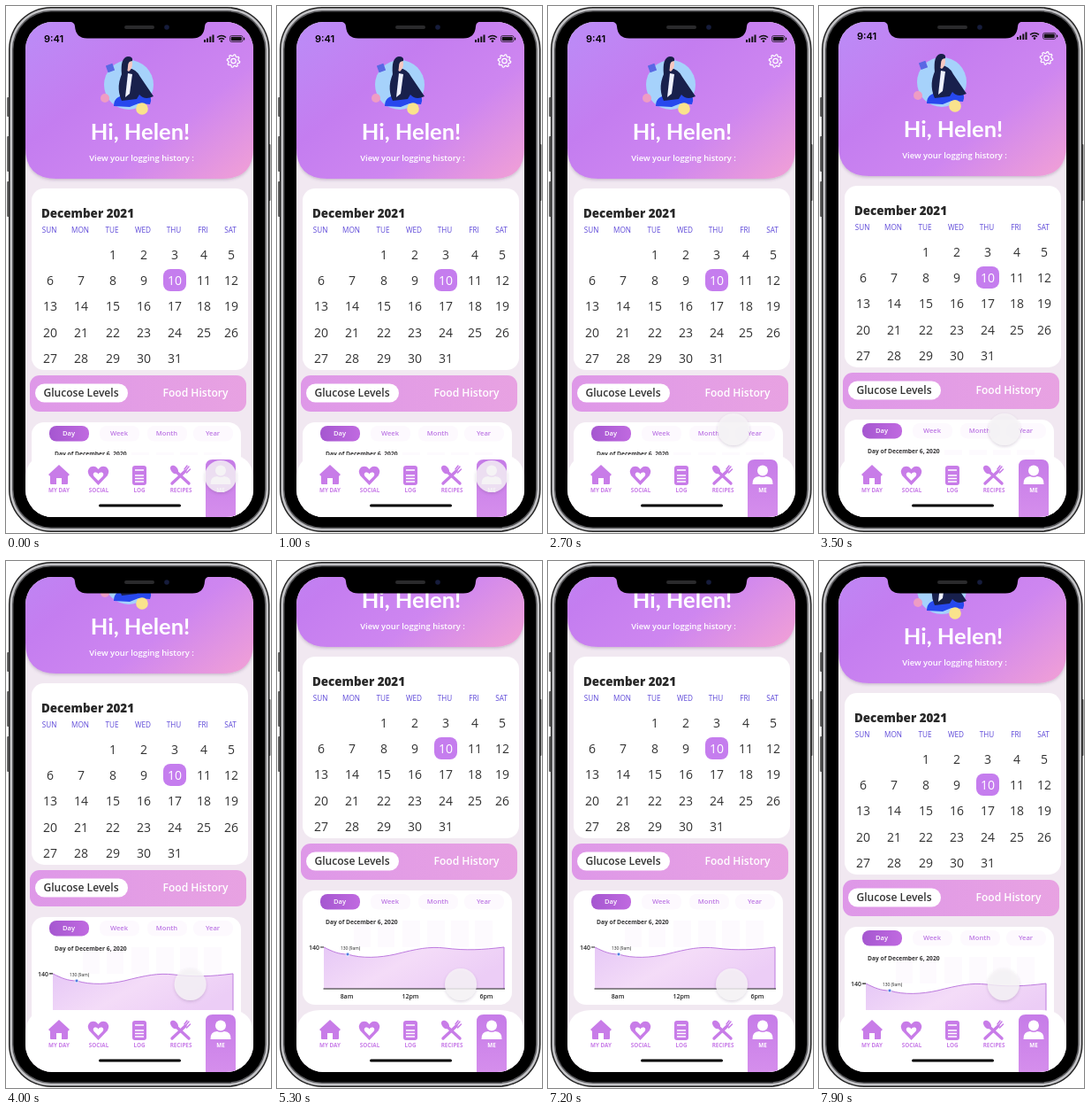
Recreate the animation shown at these times as an HTML page. Size 300 by 595 pixels, loop 8000 ms.

```html
<!DOCTYPE html>
<html lang="en">
<head>
<meta charset="utf-8">
<title>Logging history</title>
<style>
html, body { margin: 0; width: 100%; height: 100%; overflow: hidden; background: #fff; }
svg { display: block; width: 300px; height: 595px; }
text { font-family: "Open Sans", sans-serif; text-anchor: middle; }
.left { text-anchor: start; }
.semi { font-weight: 600; }
.bold { font-weight: 700; }
</style>
</head>
<body>
<svg viewBox="0 0 300 595">
  <defs>
    <linearGradient id="head" gradientUnits="userSpaceOnUse" x1="60" y1="-10" x2="250" y2="225">
      <stop offset="0" stop-color="#bb8cf7"/><stop offset=".35" stop-color="#c47df0"/>
      <stop offset=".65" stop-color="#ce86f0"/><stop offset="1" stop-color="#f4a2d4"/>
    </linearGradient>
    <linearGradient id="bar"><stop stop-color="#de98e8"/><stop offset="1" stop-color="#e8a2e2"/></linearGradient>
    <linearGradient id="pill"><stop stop-color="#a557d0"/><stop offset="1" stop-color="#c06ae0"/></linearGradient>
    <linearGradient id="tab" x2="0" y2="1"><stop stop-color="#c67ce8"/><stop offset="1" stop-color="#d58eec"/></linearGradient>
    <linearGradient id="area" x1="0" y1="0" x2="1" y2=".4">
      <stop stop-color="#e6c8f6"/><stop offset=".5" stop-color="#f4dcf8"/><stop offset="1" stop-color="#eccdf6"/>
    </linearGradient>
    <clipPath id="screen"><rect x="22" y="18" width="258" height="559" rx="31"/></clipPath>
    <filter id="soft" x="-30%" y="-30%" width="160%" height="160%">
      <feDropShadow dx="0" dy="1.5" stdDeviation="1.8" flood-color="#503060" flood-opacity=".25"/>
    </filter>
  </defs>

  <g fill="#666">
    <rect x="1" y="103" width="3" height="22" rx="1"/><rect x="1" y="147" width="3" height="40" rx="1"/>
    <rect x="1" y="198" width="3" height="40" rx="1"/><rect x="297" y="156" width="2.500" height="64" rx="1"/>
  </g>
  <rect x="3" y="1" width="295.500" height="593" rx="48" fill="#222"/>
  <rect x="4.500" y="2.500" width="292.500" height="590" rx="46.500" fill="#c4c4c7"/>
  <rect x="7" y="5" width="287.500" height="585" rx="44" fill="#58585b"/>
  <rect x="8.500" y="6.500" width="284.500" height="582" rx="42.500"/>

  <g clip-path="url(#screen)">
    <rect x="22" y="18" width="258" height="559" fill="#f1e8f1"/>
    <g id="page">
      <path d="M22 0H280V160Q280 195 245 195H57Q22 195 22 160Z" fill="url(#head)" filter="url(#soft)"/>
      <text x="54" y="41" font-size="11" class="semi" style="font-family:Inter,sans-serif">9:41</text>
      <g fill="#111">
        <path d="M224 38h2v3h-2zM227 36.500h2v4.500h-2zM230.300 34.500h2v6.500h-2zM233.500 32.500h2v8.500h-2z"/>
        <path d="M239 35.500q5-4 10 0M241 37.700q3-2.300 6 0" fill="none" stroke="#111" stroke-width="1.500"/>
        <circle cx="244" cy="39.700" r="1.300"/>
        <rect x="253.500" y="33.500" width="14.500" height="7" rx="2" fill="none" stroke="#111" stroke-width=".7"/>
        <rect x="254.700" y="34.700" width="12" height="4.600" rx="1"/><rect x="269" y="35.500" width="1.200" height="3" rx=".6"/>
      </g>
      <g fill="none" stroke="#fff" stroke-width="1.200">
        <circle cx="257.500" cy="62" r="2.700"/><path id="gear" stroke-linejoin="round"/>
      </g>

      <circle cx="139" cy="89" r="28" fill="#a6d2fb"/>
      <rect x="114" y="66" width="8" height="8" fill="#5a68e4" transform="rotate(-20 118 70)"/>
      <circle cx="112" cy="104" r="5" fill="#ee9cc4"/>
      <path d="M122 113Q122 101 136 101L158 96Q167 104 163 111L150 110L140 114Z" fill="#2748ee"/>
      <path d="M134 71Q146 68 152 80L167 102Q157 107 151 100L148 105L131 107Q123 90 134 71Z" fill="#18204c"/>
      <path d="M138 76l5 1-3 22-5 4z" fill="#eef1ff"/>
      <path d="M137 61q6-2 6 4t-4 9l-3-2z" fill="#f6c7c0"/>
      <path d="M131 78Q129 58 138 57Q144 57 143 62Q138 62 138 68Q138 78 131 78Z" fill="#182048"/>
      <circle cx="154" cy="116" r="6.800" fill="#fae38c"/>

      <text x="152" y="151" font-size="25.500" class="bold" fill="#fff" style="font-family:Lato,sans-serif">Hi, Helen!</text>
      <text x="153.500" y="175" font-size="9.400" class="semi" fill="#fff">View your logging history :</text>

      <rect x="29" y="206" width="245" height="205" rx="14" fill="#fff"/>
      <text x="40" y="239" font-size="13.400" class="left" font-weight="800" fill="#282828">December 2021</text>
      <g id="days"></g>

      <rect x="27" y="417" width="245" height="41" rx="11" fill="url(#bar)"/>
      <rect x="33" y="426.500" width="105" height="21" rx="10.500" fill="#fff"/>
      <text x="85" y="441" font-size="12.100" class="semi" fill="#333">Glucose Levels</text>
      <text x="214.500" y="441" font-size="12.100" class="semi" fill="#fff">Food History</text>

      <rect x="29" y="470" width="237" height="129" rx="14" fill="#fff"/>
      <g id="tabs" font-size="7.600" class="semi"></g>
      <path d="M87 504h19v30H87zM114 504h19v30h-19zM142 504h20v30h-20zM170 504h20v30h-20zM197 504h20v30h-20zM224 504h20v30h-20z" fill="#fdfafe"/>
      <text x="55" y="508" font-size="6.700" class="bold left" fill="#333">Day of December 6, 2020</text>
      <path d="M53 534C63 539 70 542 80 542C96 547 116 546 134 542C158 536 172 533 190 535C214 538 232 537 257 534V581H53Z" fill="url(#area)"/>
      <path d="M53 534C63 539 70 542 80 542C96 547 116 546 134 542C158 536 172 533 190 535C214 538 232 537 257 534V581" fill="none" stroke="#bd7ade"/>
      <path d="M49 534h4M52.500 581H258" stroke="#222" stroke-width="1.200"/>
      <circle cx="80" cy="542" r="2" fill="#4f7be0" stroke="#fff" stroke-width=".8"/>
      <text x="83" y="537" font-size="4.800" fill="#222">130 (9am)</text>
      <g font-size="7" class="semi" fill="#222">
        <text x="42" y="537">140</text><text x="79" y="592">8am</text><text x="151" y="592">12pm</text><text x="237" y="592">6pm</text>
      </g>
    </g>

    <path d="M22 577V535Q22 507 50 507H252Q280 507 280 535V577Z" fill="#fff"/>
    <path d="M226 577V520Q226 512 234 512H252Q260 512 260 520V577Z" fill="url(#tab)"/>
    <g fill="#c87ce8">
      <path d="M60 518L72 529L70 531V539Q70 540 69 540H63V533H57V540H51Q50 540 50 539V531L48 529Z"/>
      <path d="M104.500 541L94 530Q91 524 95.500 520.500Q101 518 104.500 523Q108 518 113.500 520.500Q118 524 115 530Z"/>
      <path d="M104.500 536l-5-5q-2-3 1-4.500 3-.5 4 2 1-2.500 4-2 3 1.500 1 4.500z" fill="#fff"/>
      <rect x="143" y="519" width="16" height="22" rx="3"/>
      <path d="M146 524h10M146 530h10M146 533.500h10M146 537h10" stroke="#fff" stroke-width="1.600"/>
      <g stroke="#c87ce8" stroke-linecap="round" fill="none">
        <path d="M188 539L203 525M194 527L207 539" stroke-width="3.400"/>
        <path d="M203 525l4-5M204.500 527l4-4M202 523l3-4" stroke-width="1.500"/>
      </g>
      <ellipse cx="190.500" cy="523.500" rx="3.700" ry="5.500" transform="rotate(-42 190.500 523.500)"/>
      <g fill="#fff"><circle cx="243" cy="524.500" r="6"/><path d="M231.500 540Q231 531.500 239 531Q243 533 247 531Q255 531.500 254.500 540Z"/></g>
    </g>
    <g id="labels" font-size="6.300" class="bold" fill="#c87ce8"></g>
    <rect x="105" y="562.500" width="93" height="3" rx="1.500"/>
  </g>

  <path d="M70 17H232Q225 18 225 23Q224 36.500 211 36.500H92Q79 36.500 78 23Q78 18 70 17Z"/>
  <rect x="134" y="22" width="34" height="4" rx="2" fill="#2a2a2c"/>
  <circle cx="182" cy="24" r="2.800" fill="#161c3c"/>
  <g id="cursor" filter="url(#soft)"><circle r="18" fill="#f8f6f8" fill-opacity=".8"/></g>
</svg>
<script>
const $ = id => document.getElementById(id);
const label = (x, y, s, attrs = '') => `<text x="${x}" y="${y}" ${attrs}>${s}</text>`;

const names = ['SUN', 'MON', 'TUE', 'WED', 'THU', 'FRI', 'SAT'];
const cols = [50, 85, 121, 156, 191, 224, 255], rows = [281, 310, 339, 369, 398];
let days = '<rect x="178" y="297" width="26" height="25" rx="8" fill="#c57dee"/>';
names.forEach((n, i) => days += label(cols[i] - 1, 256, n, 'font-size="8.2" fill="#5d48d8"'));
for (let d = 1; d <= 31; d++) {
  const cell = d + 1;
  days += label(cols[cell % 7], rows[cell / 7 | 0] + 5, d, `font-size="14" fill="${d === 10 ? '#fff' : '#333'}"`);
}
$('days').innerHTML = days;

$('tabs').innerHTML = [['Day', 71], ['Week', 128], ['Month', 182], ['Year', 234]].map(([s, x], i) =>
  `<rect x="${x - 22}" y="474" width="45" height="17.500" rx="8" fill="${i ? '#fdf9fe' : 'url(#pill)'}"/>` +
  label(x, 485, s, `fill="${i ? '#bd78e4' : '#fff'}"`)).join('');

$('labels').innerHTML = [['MY DAY', 60], ['SOCIAL', 105], ['LOG', 151], ['RECIPES', 198], ['ME', 243]]
  .map(([s, x]) => label(x, 549, s, s === 'ME' ? 'fill="#fff"' : '')).join('');

const teeth = Array.from({ length: 32 }, (_, i) => {
  const a = (i + .5) * Math.PI / 16, r = i % 4 < 2 ? 7.3 : 5.6;
  return (257.5 + r * Math.cos(a)).toFixed(2) + ' ' + (62 + r * Math.sin(a)).toFixed(2);
});
$('gear').setAttribute('d', 'M' + teeth.join('L') + 'Z');

const ease = (t, from, to) => {
  const u = Math.min(1, Math.max(0, (t - from) / (to - from)));
  return u * u * (3 - 2 * u);
};
const move = (id, x, y) => $(id).setAttribute('transform', `translate(${x} ${y})`);
const start = performance.now();

function draw() {
  const t = (performance.now() - start) % 8000;
  const scroll = 98 * (ease(t, 3400, 4350) - ease(t, 7500, 8400));
  const travel = ease(t, 2050, 2650);
  move('page', 0, -scroll);
  move('cursor', 243 - 33 * travel - scroll / 50, 531 - 53 * travel);
  requestAnimationFrame(draw);
}
draw();
</script>
</body>
</html>
```
